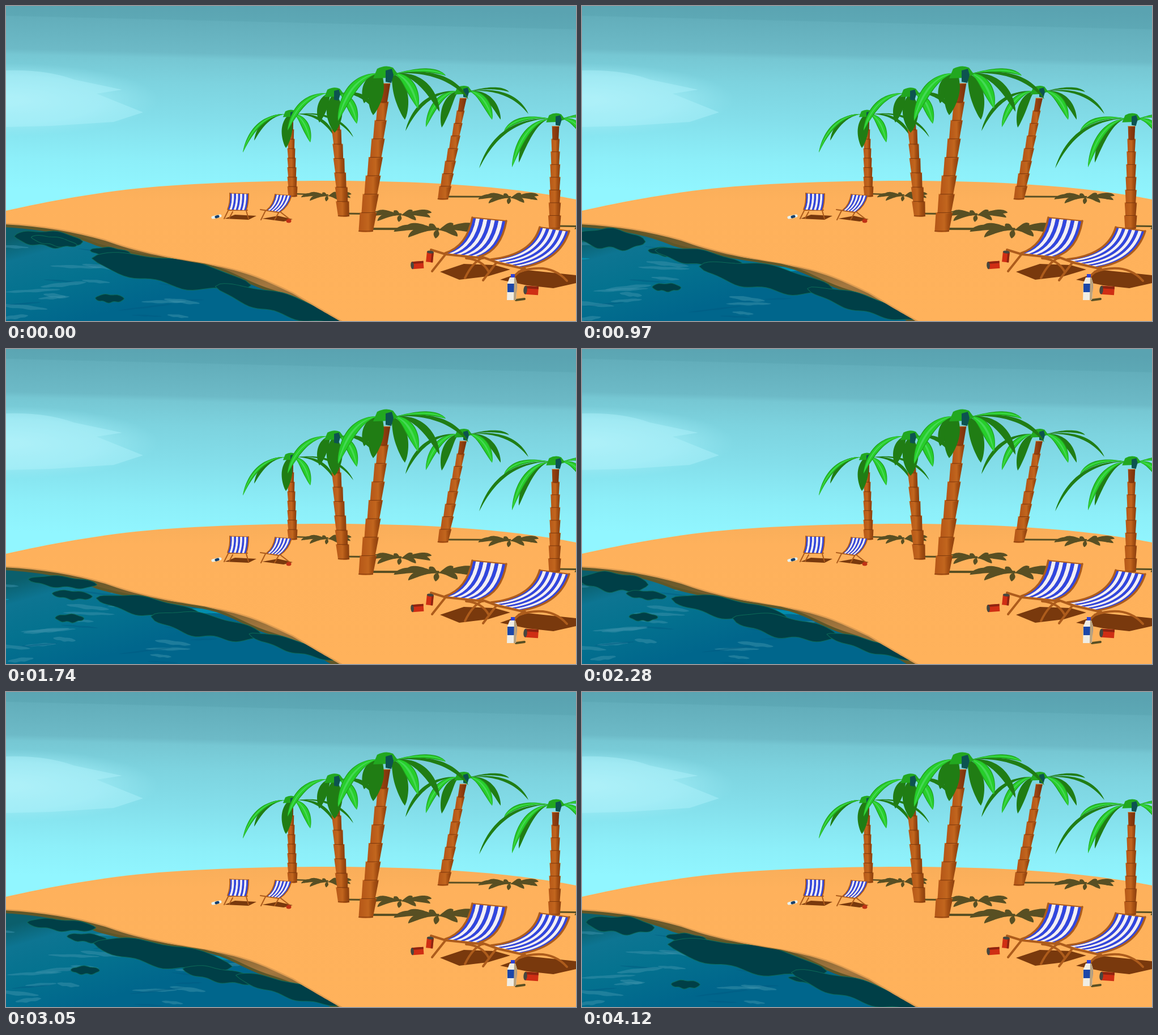
Write an HTML page with a canvas that moves like this. It is 1006 px wide and 557 px high and loops after 4.19 s.

```html
<!DOCTYPE html>
<html lang="en">
<head>
<meta charset="utf-8">
<title>Beach</title>
<style>
html, body { margin: 0; width: 100%; height: 100%; overflow: hidden; background: #ffb25c; }
canvas { display: block; width: 100%; height: 100%; }
</style>
</head>
<body>
<canvas id="stage" width="1006" height="557"></canvas>
<script>
const W = 1006, H = 557, LOOP = 4190, TAU = 2 * Math.PI;
const stage = document.getElementById('stage').getContext('2d');
const backdrop = document.createElement('canvas');
backdrop.width = W;
backdrop.height = H;
let g = backdrop.getContext('2d');

const BRIGHT = '#27ce2b', MID = '#219e1c', DARK = '#207d14', TEAL = '#0d5350';
const SHADE = '#584f23', WOOD = '#ad5c1c', BROWN = '#79390d';

// ---------- drawing helpers ----------
const mix = (a, b, k) => a + (b - a) * k;

function fill(d, color) {
  g.fillStyle = color;
  g.fill(new Path2D(d));
}

function line(d, color, width) {
  g.strokeStyle = color;
  g.lineWidth = width;
  g.lineCap = g.lineJoin = 'round';
  g.stroke(new Path2D(d));
}

function linear(x0, y0, x1, y1, stops) {
  const gradient = g.createLinearGradient(x0, y0, x1, y1);
  stops.forEach(([at, color]) => gradient.addColorStop(at, color));
  return gradient;
}

function ellipse(x, y, rx, ry, color) {
  g.fillStyle = color;
  g.beginPath();
  g.ellipse(x, y, rx, ry, 0, 0, TAU);
  g.fill();
}

// A blade along an arch from (x0, y0) to (x1, y1), widest past its middle.
function leaf(color, width, x0, y0, x1, y1) {
  const cx = mix(x0, x1, 0.72), cy = mix(y0, y1, 0.22) - Math.abs(x1 - x0) * 0.15;
  const at = (a, c, b, k) => mix(mix(a, c, k), mix(c, b, k), k);
  const left = [], right = [];
  for (let i = 0; i <= 24; i++) {
    const k = i / 24;
    const x = at(x0, cx, x1, k), y = at(y0, cy, y1, k);
    const tx = mix(cx - x0, x1 - cx, k), ty = mix(cy - y0, y1 - cy, k);
    const swell = Math.max(0, Math.sin(Math.PI * k ** 1.35)) ** 0.75;
    const half = width * swell * 0.55 / Math.hypot(tx, ty);
    left.push([x - ty * half, y + tx * half]);
    right.unshift([x + ty * half, y - tx * half]);
  }
  fill('M' + left.concat(right).join('L') + 'Z', color);
}

// ---------- palms ----------
function trunk({ x, y, baseX, baseY, size }) {
  const count = 8, top = y + 18 * size;
  for (let i = count - 1; i >= 0; i--) {
    const k0 = i / count, k1 = (i + 1) / count;
    const half = size * mix(6, 14, k1 ** 0.7), a = half * 1.06, b = half * 0.9;
    const x0 = mix(x, baseX, k0), x1 = mix(x, baseX, k1);
    const y0 = mix(top, baseY, k0), y1 = mix(top, baseY, k1);
    fill(`M${x0 - a},${y0} H${x0 + a} L${x1 + b},${y1 + 1} Q${x1},${y1 + 3} ${x1 - b},${y1 + 1}Z`,
      linear(x0 - a, 0, x0 + a, 0, i
        ? [[0, '#b65818'], [0.5, '#c2661e'], [0.72, '#a54f12'], [1, '#8a3f0e']]
        : [[0, '#9b4411'], [1, '#76300b']]));
    line(`M${x0 - a},${y0} H${x0 + a}`, '#d9812f', 1);
    line(`M${x1 - b},${y1} H${x1 + b}`, '#7d390d', 1);
  }
}

// Steep leaves are broad, long flat ones are thin.
function leafWidth(dx, dy, size) {
  const steep = Math.max(0, dy) / (Math.abs(dx) + Math.abs(dy));
  const reach = Math.min(1, (112 * size / Math.hypot(dx, dy)) ** 2);
  return size * (5 + 28 * steep ** 1.5 * reach);
}

function palm(tree) {
  const { x, y, size, dark, bright } = tree;
  trunk(tree);
  const place = (tips, draw) => tips.forEach(([tipX, tipY]) => {
    const dx = tipX - x, width = leafWidth(dx, tipY - y, size);
    draw(width, x + Math.max(-14, Math.min(18, dx * 0.25)) * size, y, tipX, tipY);
  });
  place(dark, (...shape) => leaf(DARK, ...shape));
  place(bright, (width, ...ends) => {
    leaf(MID, width + 1.5, ...ends);
    leaf(BRIGHT, width - 1, ...ends);
    leaf('#45d856', width * 0.22, ...ends);
  });
  g.save();
  g.translate(x, y);
  g.scale(size, size);
  fill('M-22,9 L-15,-8 Q0,-16 13,-10 L22,2 L4,8Z', '#22a820');
  fill('M0,-5 L11,-8 L14,3 L10,17 L0,15Z', TEAL);
  g.restore();
}

function palmShadow({ baseX, baseY, size, shadow }) {
  const cx = baseX + shadow, cy = baseY - shadow * 0.03, rx = 80 * size;
  line(`M${baseX},${baseY - 4} L${cx},${cy}`, SHADE, 4 * size);
  for (let i = 0; i < 9; i++) {
    const angle = i / 9 * TAU + 0.25, reach = rx * (0.86 + 0.14 * Math.sin(i * 5));
    leaf(SHADE, 9 * size, cx, cy + 2, cx + Math.cos(angle) * reach, cy + 3 + Math.sin(angle) * reach * 0.22);
  }
}

const palms = [
  { x: 502, y: 191, baseX: 506, baseY: 336, size: 0.6, shadow: 62,
    dark: [[438, 238], [581, 233], [613, 232], [494, 251]], bright: [[418, 259], [537, 241]] },
  { x: 579, y: 154, baseX: 596, baseY: 371, size: 0.78, shadow: 101,
    dark: [[646, 178], [580, 224], [553, 206]], bright: [[497, 220], [619, 208]] },
  { x: 807, y: 150, baseX: 771, baseY: 341, size: 0.72, shadow: 119,
    dark: [[705, 221], [769, 215], [873, 201], [888, 152], [922, 191]], bright: [[741, 214], [858, 201]] },
  { x: 670, y: 119, baseX: 635, baseY: 398, size: 1, shadow: 128,
    dark: [[632, 172], [704, 201], [816, 165], [765, 187], [648, 193]],
    bright: [[776, 123], [586, 203], [727, 181]] },
  { x: 970, y: 199, baseX: 968, baseY: 393, size: 0.76, shadow: 95,
    dark: [[835, 287], [905, 277]], bright: [[879, 221], [893, 285], [1030, 196], [1022, 235]] }
];

// ---------- sky, sand and furniture ----------
function drawSky() {
  g.fillStyle = linear(503, 0, 495, 335, [
    [0, '#5aa3b1'], [0.085, '#5da8b5'], [0.09, '#63aebb'], [0.26, '#6dbac7'],
    [0.29, '#76c7d3'], [0.42, '#7dd3df'], [0.62, '#84dfeb'], [0.84, '#8deff9'], [1, '#91f6ff']]);
  g.fillRect(0, 0, W, 380);
  g.save();
  g.translate(0, 166);
  g.scale(1, 0.24);
  const glow = g.createRadialGradient(0, 0, 30, 0, 0, 270);
  glow.addColorStop(0, '#b3f3fad0');
  glow.addColorStop(0.6, '#a7eff890');
  glow.addColorStop(1, '#9beaf400');
  g.fillStyle = glow;
  g.fillRect(0, -300, 330, 600);
  g.restore();
  fill('M0,114 Q70,112 120,130 L205,148 L160,155 L242,188 L190,205 L80,212 L0,214Z', '#b0f2fa70');
}

function drawSand() {
  fill('M0,362 C70,346 170,327 270,319 C390,310 500,309 570,309 C720,309 880,317 1006,342 V557 H0Z',
    linear(0, 310, 0, 557, [[0, '#f9ae5a'], [0.15, '#feb15c'], [1, '#ffb25b']]));
}

// Striped cloth stretched between two curved rails.
function cloth(left, right, rail) {
  const stripes = 9, edge = k => left.map((v, i) => mix(v, right[i], k));
  for (let i = 0; i < stripes; i++) {
    const a = edge(i / stripes), b = edge((i + 1) / stripes);
    fill(`M${a[0]},${a[1]} Q${a.slice(2)} L${b[4]},${b[5]} Q${b[2]},${b[3]} ${b[0]},${b[1]}Z`,
      i % 2 ? '#f1eff8' : '#3046e0');
  }
  for (const [x, y, ...rest] of [left, right]) line(`M${x},${y} Q${rest}`, WOOD, rail);
  line(`M${left[0]},${left[1]} L${right[0]},${right[1]}`, WOOD, rail * 0.6);
}

function can(x, y, w, h, angle) {
  g.save();
  g.translate(x, y);
  g.rotate(angle);
  g.fillStyle = '#cf2e14';
  g.fillRect(-w / 2, -h / 2, w, h);
  g.fillStyle = '#8e2410';
  g.fillRect(w * 0.2, -h / 2, w * 0.3, h);
  ellipse(0, -h / 2, w / 2, h * 0.14, '#45473f');
  g.restore();
}

function drawFurniture() {
  // small pair
  fill('M386,376 L404,369 L442,371 L428,378Z M452,376 L480,371 L506,377 L490,381Z', BROWN);
  line('M393,360 L385,376 M393,361 H426 M424,362 L428,376 M400,364 L394,375', WOOD, 2);
  cloth([395, 331, 396, 348, 391, 360], [428, 332, 428, 350, 424, 361], 1.8);
  line('M449,360 L482,365 M458,362 L450,378 M482,364 L474,378 M484,364 L502,378', WOOD, 2);
  cloth([475, 333, 472, 352, 460, 361], [504, 335, 499, 354, 484, 364], 1.8);
  line('M365,374 L378,371', '#e8f2ef', 5);
  line('M371,373 L374,372', '#17406b', 5);
  ellipse(499, 380, 4.5, 3.5, '#bf3216');

  // large pair
  fill('M766,470 L808,456 L862,458 L890,466 L850,478 L800,484Z', BROWN);
  fill('M872,484 L920,467 L1006,476 V490 L966,499 L920,494Z', BROWN);
  line('M775,440 L752,469 M842,445 Q824,452 810,481 M812,446 Q840,448 852,470', WOOD, 4);
  cloth([823, 374, 814, 424, 775, 437], [883, 380, 874, 432, 836, 443], 3.5);
  line('M750,431 L776,439 L842,446', WOOD, 4);
  line('M866,453 L842,485 M916,465 Q900,470 891,488 M905,470 Q960,452 990,486', WOOD, 4);
  cloth([942, 391, 928, 440, 856, 448], [994, 398, 978, 450, 912, 462], 3.5);
  line('M841,444 L868,454 L916,465', WOOD, 4);

  can(748, 444, 12, 18, 0.1);
  can(727, 458, 13, 20, -1.65);
  can(928, 503, 15, 23, -1.5);
  line('M900,520 L915,518', SHADE, 4);
  fill('M889,480 H899 L902,490 L900,520 H884 L885,490Z', '#f0ede4');
  fill('M885,491 H902 L901,506 H885Z', '#1c47a8');
  fill('M897,480 H899 L902,490 L900,520 H896Z', '#b9a27e');
  fill('M891,474 H898 V480 H891Z', '#2e43d6');
}

// ---------- sea ----------
const shore = 'M-5,386 C60,389 120,399 175,415 C230,435 280,444 340,455 C420,467 450,482 505,508 C545,532 570,546 594,560';
const brink = 'M-5,391 C60,395 110,403 160,424 C220,442 290,449 350,460 C400,470 420,492 470,506 C520,522 550,543 578,560';
const shoreArea = new Path2D(shore + 'L-5,560Z');
const waterArea = new Path2D(brink + 'L-5,560Z');

// A tilted lens with rippled edges.
function lens(x, y, halfWidth, halfHeight, tilt, phase) {
  const top = [], bottom = [];
  for (let i = 0; i <= 30; i++) {
    const k = i / 15 - 1, swell = halfHeight * (1 - k * k) ** 0.6;
    const px = x + k * halfWidth, py = y + k * halfWidth * tilt;
    top.push([px, py - swell * (1 + 0.14 * Math.sin(k * 6 + phase))]);
    bottom.unshift([px, py + swell * (1 + 0.2 * Math.sin(k * 8 - phase))]);
  }
  return 'M' + top.concat(bottom).join('L') + 'Z';
}

function darkWater(...shape) {
  const d = lens(...shape);
  line(d, '#0c6a57', 2);
  fill(d, '#003f47');
}

// A crest drifts in over two loops: [loops, x, y, half width, half height].
const crestPath = [
  [0, 85, 416, 40, 7], [0.35, 252, 456, 92, 15], [1, 292, 470, 140, 23],
  [1.45, 355, 490, 97, 19], [2, 400, 511, 35, 4]];

function drawCrest(loops, phase) {
  const i = crestPath.findIndex(([end]) => end > loops);
  const from = crestPath[i - 1], to = crestPath[i];
  const k = (loops - from[0]) / (to[0] - from[0]), ease = k * k * (3 - 2 * k);
  const [x, y, w, h] = from.map((v, j) => mix(v, to[j], ease)).slice(1);
  darkWater(x, y, w, h, 0.17, phase);
}

function drawSea(time) {
  const turn = time / LOOP, phase = turn * TAU;
  const sway = Math.cos(phase), chop = Math.sin(3 * phase);
  line(shore, '#e09d52', 5);
  g.fillStyle = linear(0, 380, 0, 557, [[0, '#5e5528'], [0.4, '#7b602f'], [0.65, '#a4773f'], [1, '#5e5528']]);
  g.fill(shoreArea);
  line(brink, '#5f5728', 9);

  g.save();
  g.clip(waterArea);
  g.fillStyle = linear(80, 390, 130, 557, [[0, '#0b5f6c'], [0.22, '#0d7592'], [0.55, '#04728f'], [1, '#00668c']]);
  g.fillRect(0, 380, 620, 180);
  for (let i = 0; i < 34; i++) {
    const a = i * 0.618 % 1, b = (i * 0.755 + 0.2) % 1;
    const x = a * 500 - 20 + 16 * Math.sin(phase + i * 2);
    const y = 420 + b * 132 + 4 * Math.cos(phase + i);
    const color = i % 8 == 0 ? '#06a3c5a0' : i % 3 ? '#3c92ab80' : '#00598170';
    fill(lens(x, y, 18 + i * 37 % 36, 1.5 + i % 3, 0.12 * Math.sin(i), phase + i), color);
  }
  g.restore();

  g.save();
  g.clip(shoreArea);
  darkWater(75 + 25 * chop, 412, 60, 13 - 4 * chop, 0.08, phase);
  darkWater(148 + 36 * sway, 435, 35, 7, 0.08, phase + 2);
  darkWater(145 + 38 * sway, 495 + 22 * sway, 25, 6.5, 0.02, phase + 4);
  drawCrest(turn, phase);
  drawCrest(turn + 1, phase);
  const left = 402 - 32 * sway;
  darkWater((left + 592) / 2, 526, (592 - left) / 2, 14 + 4 * sway, 0.27, phase + 1);
  g.restore();
}

drawSky();
drawSand();
palms.forEach(palmShadow);
palms.forEach(palm);
drawFurniture();
g = stage;

function render(now) {
  g.drawImage(backdrop, 0, 0);
  drawSea(now % LOOP);
  requestAnimationFrame(render);
}
render(0);
</script>
</body>
</html>
```
